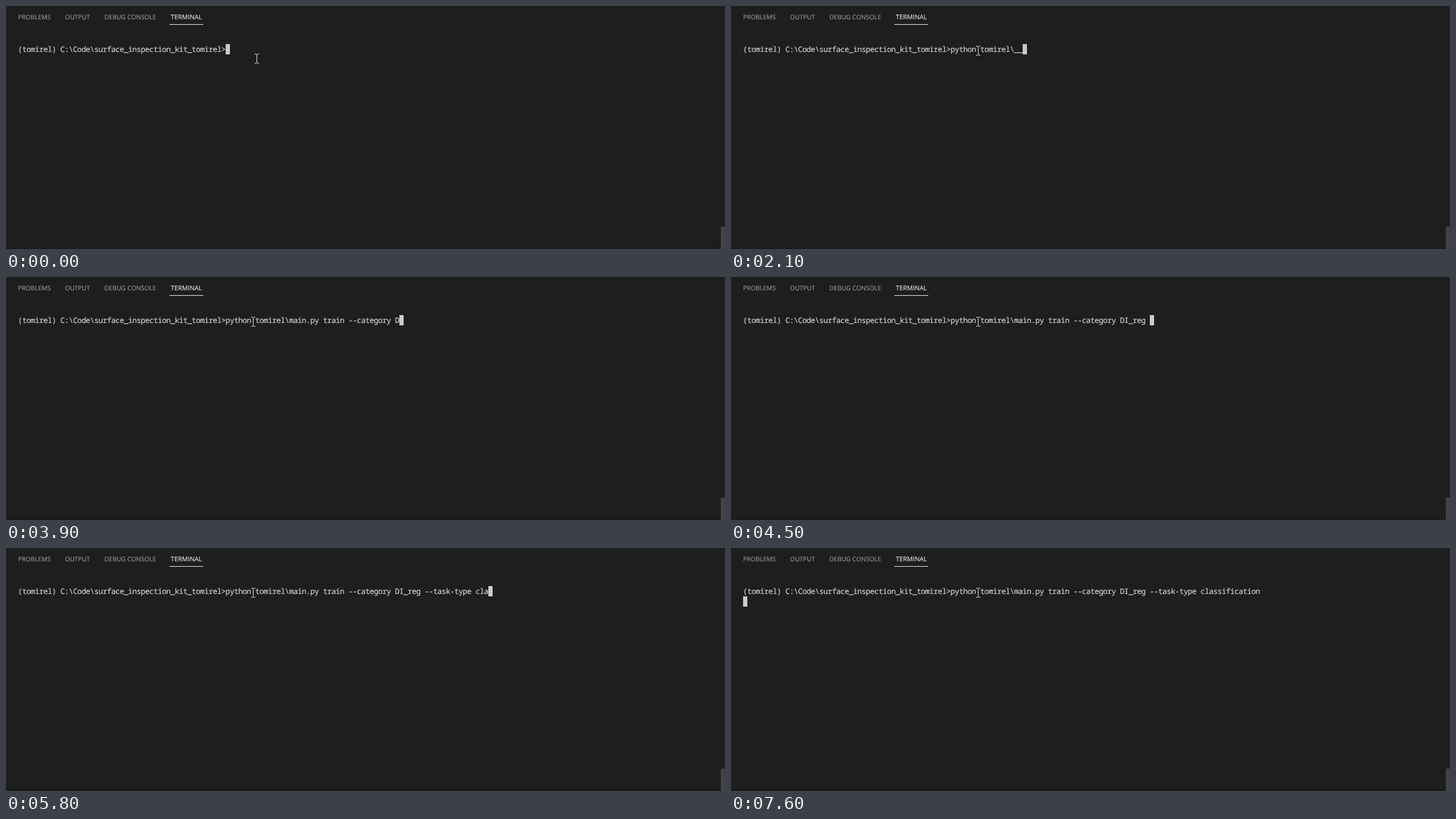
These frames come from a looping animation (1188x402 px, 8000 ms). An HTML page:

```html
<!DOCTYPE html>
<html lang="en">
<head>
<meta charset="utf-8">
<title>Terminal session</title>
<style>
  html, body { margin: 0; width: 100%; height: 100%; overflow: hidden; background: #1e1e1e; }
  svg { display: block; }
  text { text-rendering: geometricPrecision; white-space: pre; }
  .tabs { font: 10.45px "Open Sans", "Noto Sans", sans-serif; fill: #9d9d9d; stroke: #9d9d9d; stroke-width: .12px; }
  .tabs .active { font-size: 10.7px; fill: #e7e7e7; stroke: #e7e7e7; }
  /* 0.6em advance less the tracking gives a 7px character cell */
  .shell { font: 12.5px "Noto Sans Mono", monospace; letter-spacing: -.5px; fill: #d0d0d0; stroke: #d0d0d0; stroke-width: .2px; }
  #pointer { fill: #e4e4e4; animation: drift 8s step-end infinite; }
  @keyframes drift {
    0% { transform: translate(411px, 79px); }
    1.25% { transform: translate(408px, 72px); }
    2.5%, 100% { transform: translate(405px, 66px); }
  }
</style>
</head>
<body>
<svg width="1188" height="402" viewBox="0 0 1188 402">
  <rect width="1188" height="402" fill="#1e1e1e"/>
  <rect y="398" width="1181" height="4" fill="#1b1b1b"/>
  <rect x="1181" y="365" width="7" height="37" fill="#424242"/>
  <g class="tabs">
    <text x="20" y="22">PROBLEMS</text>
    <text x="97.5" y="22">OUTPUT</text>
    <text x="162.5" y="22">DEBUG CONSOLE</text>
    <text class="active" x="272.3" y="22">TERMINAL</text>
  </g>
  <rect x="270" y="30" width="56" height="1" fill="#e7e7e7"/>
  <g class="shell">
    <text x="19.8" y="76">(tomirel) C:\Code\surface_inspection_kit_tomirel&gt;</text>
    <text id="command" x="362.8" y="76"></text>
  </g>
  <rect id="caret" width="7" height="17" fill="#ccc"/>
  <path id="pointer" d="M0 0h3v1h-3z M4 0h3v1h-3z M3 1h1v14h-1z M0 15h3v1h-3z M4 15h3v1h-3z"/>
</svg>
<script>
  const LOOP = 8000, STEP = 100, ENTER = 7000;
  const CELL = 7, LEFT = 20, INPUT = 363, ROW = 63, ROW_HEIGHT = 17;
  const BACKSPACE = "\b";

  // Start, end and keys of each burst; equal times mean a completion in one go
  const bursts = [
    [100, 500, "pytho"],
    [700, 800, "n "],
    [1100, 1200, "tomire"],
    [1300, 1300, "l"],
    [1500, 1500, "\\"],
    [1700, 1700, "__init__.py"],
    [1900, 2200, BACKSPACE.repeat(12)],
    [2300, 2400, "\\ma"],
    [2500, 2500, "in.py"],
    [2700, 3500, " train --cate"],
    [3600, 4200, "gory DI_reg"],
    [4500, 5000, " --task-"],
    [5300, 5500, "type "],
    [5600, 6100, "classi"],
    [6200, 6600, "fication"]
  ];

  const command = document.getElementById("command");
  const caret = document.getElementById("caret");
  const pointer = document.getElementById("pointer");

  // Keys of a burst arrive evenly, rounded to whole keys at every step
  function pressedKeys([start, end, keys], t) {
    if (t < start) return "";
    const steps = (end - start) / STEP + 1;
    const done = Math.floor((t - start) / STEP) + 1;
    return keys.slice(0, Math.round(keys.length * Math.min(done / steps, 1)));
  }

  function typedText(t) {
    const keys = bursts.map(burst => pressedKeys(burst, t)).join("");
    return [...keys].reduce((text, key) => key === BACKSPACE ? text.slice(0, -1) : text + key, "");
  }

  function draw(t) {
    const text = typedText(t);
    const entered = t >= ENTER;
    command.textContent = text;
    caret.setAttribute("x", entered ? LEFT : INPUT + text.length * CELL);
    caret.setAttribute("y", entered ? ROW + ROW_HEIGHT : ROW);
  }

  const began = performance.now();
  pointer.getAnimations().forEach(animation => animation.startTime = began);

  function frame() {
    draw((performance.now() - began) % LOOP);
    requestAnimationFrame(frame);
  }
  frame();
</script>
</body>
</html>
```
